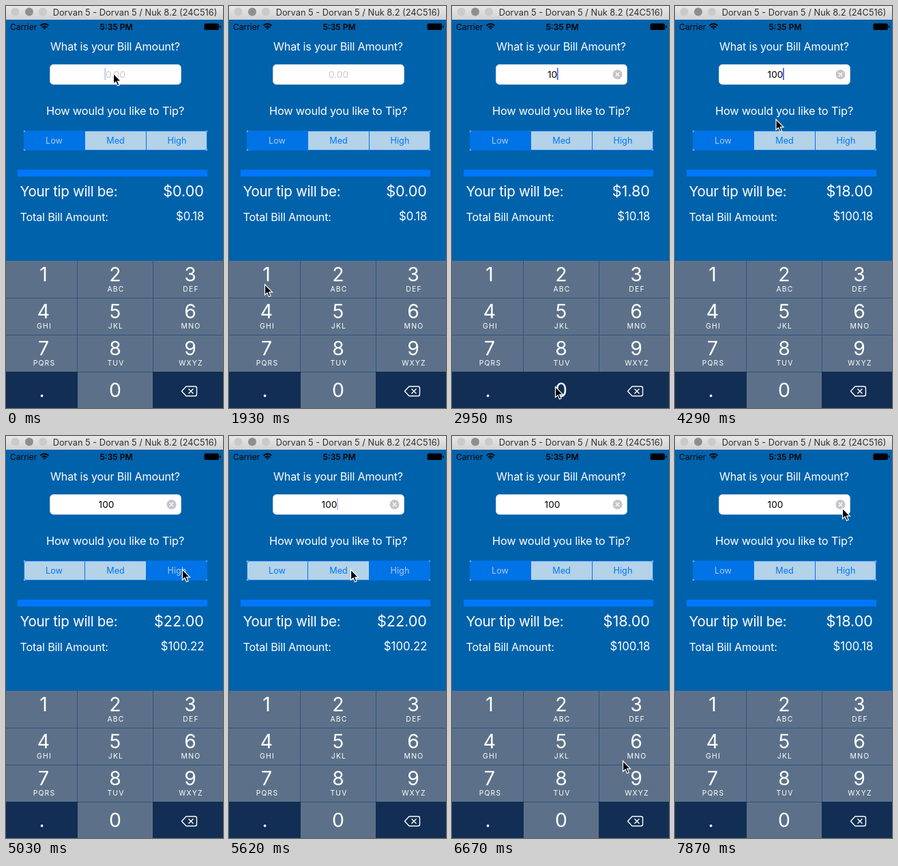
Write an HTML page that moves like this. It is 318 px wide and 587 px high and loops after 8000 ms.

```html
<!DOCTYPE html>
<html lang="en">
<head>
<meta charset="utf-8">
<title>Tip calculator</title>
<style>
  html, body { margin: 0; width: 100%; height: 100%; overflow: hidden; background: #0062ab; }
  svg { display: block; width: 318px; height: 587px; font-family: Inter, Roboto, sans-serif; }
  .label { font-size: 16.2px; letter-spacing: -.2px; fill: #fff; }
  .question { font-size: 16.4px; }
  .tip { font-size: 20.6px; letter-spacing: -.35px; fill: #fff; }
  .tip-value { font-size: 21.6px; fill: #fff; text-anchor: end; }
  .total-value { font-size: 16.8px; fill: #fff; text-anchor: end; }
  .mid { text-anchor: middle; }
  .digit { font-size: 28.4px; font-weight: 400; fill: #fff; }
  .letters { font-size: 10.4px; letter-spacing: 1.2px; fill: #fff; }
  .status { font-size: 12px; fill: #000; }
  .segment { font-size: 12.7px; }
  .entry { font-size: 13.7px; }
</style>
</head>
<body>
<svg id="stage" viewBox="0 0 318 587">
  <defs>
    <linearGradient id="chrome" x2="0" y2="1">
      <stop stop-color="#e9e8e9"/><stop offset="1" stop-color="#d2d1d2"/>
    </linearGradient>
  </defs>
  <rect width="318" height="587" fill="#0062ab"/>
  <rect width="318" height="20" fill="url(#chrome)"/>
  <circle cx="13.500" cy="8.500" r="6" fill="#cbcacb"/>
  <circle cx="34" cy="8.500" r="6" fill="#8f8e8f"/>
  <circle cx="54" cy="8.500" r="6" fill="#cbcacb"/>
  <text x="189" y="14" class="mid" font-size="12.8" fill="#2e2e2e">Dorvan 5 - Dorvan 5 / Nuk 8.2 (24C516)</text>

  <text x="6" y="34.500" class="status">Carrier</text>
  <g fill="none" stroke="#000" stroke-width="1.800">
    <path d="M50.500 28.500Q56.500 23.500 62.500 28.500M52.700 31Q56.500 27.800 60.300 31"/>
    <path d="M54.500 32Q56.500 30.500 58.500 32L56.500 34.500Z" fill="#000" stroke="none"/>
  </g>
  <text x="161.500" y="34.500" class="status mid" font-weight="600">5:35 PM</text>
  <rect x="290.500" y="25.500" width="21.500" height="9.500" rx="2"/>
  <rect x="313" y="28.500" width="1.500" height="3.500" rx=".7"/>

  <text x="160" y="64.500" class="label mid">What is your Bill Amount?</text>
  <rect x="64.500" y="85.500" width="192" height="29" rx="5" fill="#fff" stroke="#c9d8e6" stroke-width=".8"/>
  <text id="entry" y="104.800" class="entry mid"></text>
  <rect id="caret" y="90.500" width="1.800" height="17.500" fill="#3d66e6"/>
  <g id="clear">
    <circle cx="242.500" cy="100" r="7" fill="#c4c4c9"/>
    <path d="M239.800 97.300l5.400 5.400m0-5.400l-5.400 5.400" stroke="#fff" stroke-width="1.300"/>
  </g>

  <text x="160" y="159" class="label question mid">How would you like to Tip?</text>
  <rect x="26" y="182" width="269" height="29" fill="#b4d2e8"/>
  <g id="segments"></g>
  <rect x="26.500" y="182.500" width="268" height="28" rx="3.500" fill="none" stroke="#0073e6"/>
  <path d="M115.500 182v29M205.500 182v29" stroke="#0073e6"/>

  <rect x="17" y="239" width="278" height="10" fill="#0077ff"/>
  <text x="20.500" y="278" class="tip">Your tip will be:</text>
  <text id="tip" x="290" y="278" class="tip-value"></text>
  <text x="20.500" y="313.500" class="label">Total Bill Amount:</text>
  <text id="total" x="290.500" y="313" class="total-value"></text>

  <g id="pad"></g>
  <g fill="none" stroke="#fff" stroke-width="1.400">
    <path d="M257.500 562.500L264 555.500H277Q279.500 555.500 279.500 558V567Q279.500 569.500 277 569.500H264Z" stroke-linejoin="round"/>
    <path d="M267.500 559l7 7m0-7l-7 7"/>
  </g>
  <path id="cursor" d="M.5 .5V16L4 12.800L6.500 18.500L9.100 17.500L6.700 11.900H11.500Z" stroke="#fff" stroke-width="1.200"/>
</svg>
<script>
const LOOP = 8000, TICK = 148.2;
const KEY = '#5c7189', DARK = '#122e54';
const byId = id => document.getElementById(id);

function add(parent, tag, attrs, text = '') {
  const node = document.createElementNS('http://www.w3.org/2000/svg', tag);
  for (const name in attrs) node.setAttribute(name, attrs[name]);
  node.textContent = text;
  return parent.appendChild(node);
}

// A dark key also covers the separators around it.
function paintKey(key, dark) {
  key.setAttribute('fill', dark ? DARK : KEY);
  key.setAttribute('stroke', dark ? DARK : 'none');
}

const segments = ['Low', 'Med', 'High'].map((name, i) => ({
  box: add(byId('segments'), 'rect', { x: [26.5, 115.5, 205.5][i], y: 182.5, width: 89.5, height: 28, rx: 2 }),
  text: add(byId('segments'), 'text', { x: 70.5 + 90 * i, y: 201, class: 'segment mid' }, name)
}));

const colX = [0, 105, 216, 318], rowY = [372, 427, 481, 535, 587], middle = [55, 160, 270];
const captions = ['', 'ABC', 'DEF', 'GHI', 'JKL', 'MNO', 'PQRS', 'TUV', 'WXYZ'];
const keys = {};
const pad = byId('pad');
add(pad, 'rect', { y: 372, width: 318, height: 215, fill: '#36517a' });
[...'123456789.0<'].forEach((char, i) => {
  const col = i % 3, row = Math.floor(i / 3);
  const x = colX[col], y = rowY[row];
  keys[char] = add(pad, 'rect', {
    x, y, width: colX[col + 1] - x - (col < 2 ? 1 : 0), height: rowY[row + 1] - y - (row < 3 ? 1 : 0),
    'stroke-width': 2
  });
  paintKey(keys[char], char === '.' || char === '<');
  if (char === '<') return;
  const center = char === '.' ? 52.5 : middle[col];
  add(pad, 'text', { x: center, y: row < 3 ? 402 + 54 * row : 571, class: 'digit mid' }, char);
  if (row < 3) add(pad, 'text', { x: center + 1, y: 417 + 54 * row, class: 'letters mid' }, captions[i]);
});

// time, bill, chosen segment, pressed key
const states = [
  [0, '', 0, ''], [2070, '', 0, '1'], [2220, '1', 0, ''],
  [2660, '1', 0, '0'], [2810, '10', 0, ''], [2950, '10', 0, '0'], [3100, '100', 0, ''],
  [4880, '100', 2, ''], [5920, '100', 1, ''], [6215, '100', 0, '']
];

// time, x, y of the pointer tip
const path = [
  [0, 157, 98], [1482, 157, 98], [1927, 52, 406], [2224, 53, 407], [2520, 143, 545],
  [2668, 151, 555.5], [3557, 151, 555.5], [4298, 147.5, 165], [4594, 267, 191], [5200, 256, 195],
  [5632, 178, 194.5], [5928, 160, 196], [6224, 72, 196], [6669, 250, 474], [6817, 252, 477],
  [7114, 275, 547], [7262, 276, 547], [7855, 245, 105], [LOOP, 245, 105]
];

function pointerAt(t) {
  const next = path.findIndex(p => p[0] > t);
  const [t0, x0, y0] = path[next - 1], [t1, x1, y1] = path[next];
  const u = (t - t0) / (t1 - t0), e = u * u * (3 - 2 * u);
  return [x0 + (x1 - x0) * e, y0 + (y1 - y0) * e];
}

function caretAt(t) {
  if (t > 2200 && t < 3600) return 1;
  const phase = (t + 513) % 950;
  return phase < 440 ? 1 : phase < 525 ? 0.35 : 0;
}

function render(t) {
  const [, bill, choice, pressed] = states.filter(s => s[0] <= t).pop();
  const rate = 0.18 + 0.02 * choice;

  const entry = byId('entry');
  entry.textContent = bill || '0.00';
  entry.setAttribute('x', bill ? 147 : 160.5);
  entry.setAttribute('fill', bill ? '#000' : '#c7c7cd');
  byId('clear').setAttribute('opacity', bill ? 1 : 0);
  byId('caret').setAttribute('x', bill ? 145.2 + 4.3 * bill.length : 144.3);
  byId('caret').setAttribute('opacity', caretAt(t));

  segments.forEach(({ box, text }, i) => {
    box.setAttribute('fill', i === choice ? '#0073e6' : '#b4d2e8');
    text.setAttribute('fill', i === choice ? '#a9cdec' : '#0077f5');
  });
  byId('tip').textContent = '$' + (bill * rate).toFixed(2);
  byId('total').textContent = '$' + (+bill + rate).toFixed(2);
  for (const char of '10') paintKey(keys[char], char === pressed);

  byId('cursor').setAttribute('transform', `translate(${pointerAt(t)})`);
}

const start = performance.now();
function frame() {
  const t = (performance.now() - start) % LOOP;
  render(Math.min(53, Math.floor((t + 20) / 148.3)) * TICK);
  requestAnimationFrame(frame);
}
frame();
</script>
</body>
</html>
```
